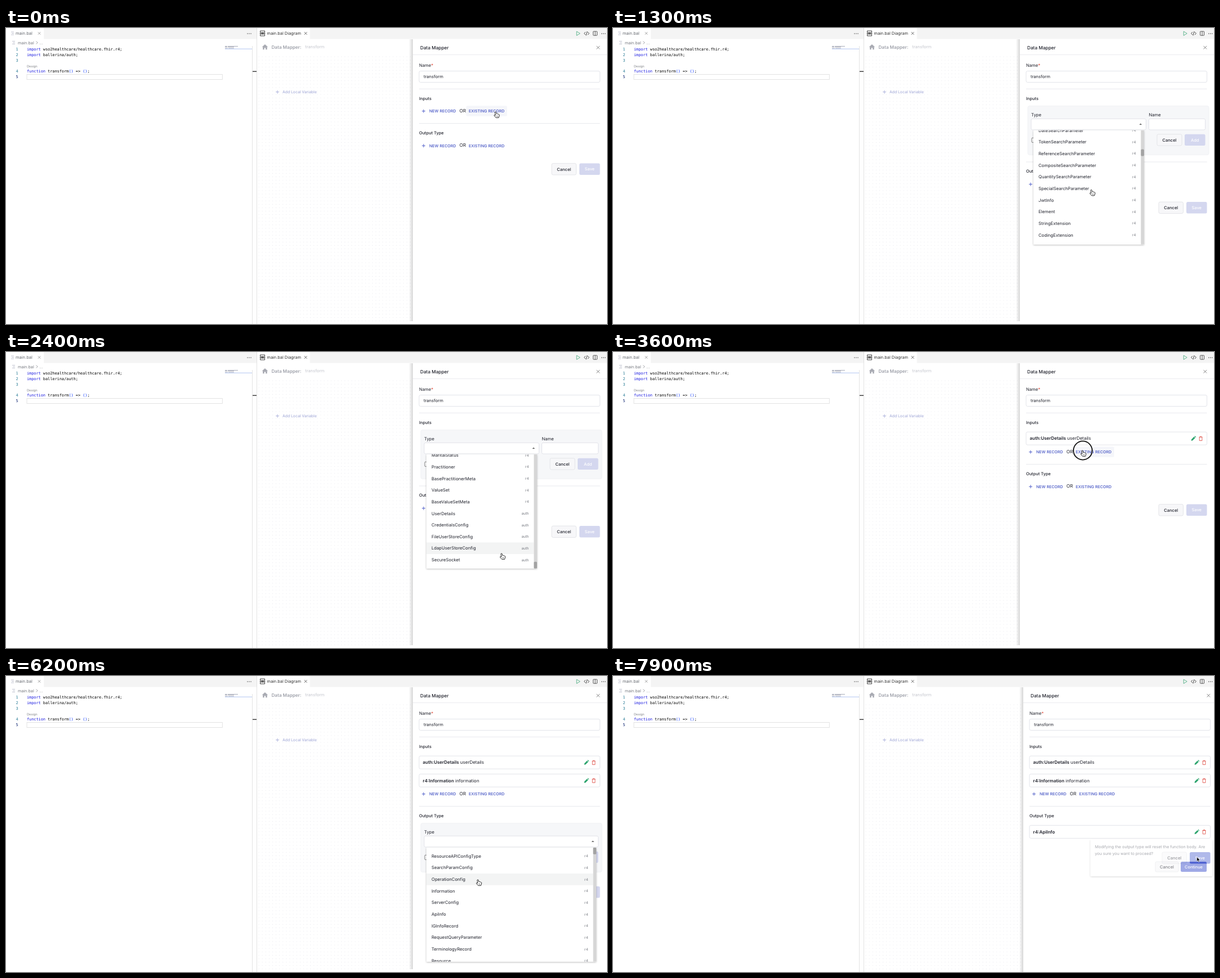
Recreate the animation shown at these times as an HTML page. Size 1065 by 526 pixels, loop 8000 ms.

```html
<!DOCTYPE html>
<html lang="en">
<head>
<meta charset="utf-8">
<title>Data Mapper</title>
<style>
  html, body { margin: 0; width: 100%; height: 100%; overflow: hidden; background: #fff; }
  svg { display: block; width: 1065px; height: 526px; text-rendering: geometricPrecision; }
  text { font-family: Inter, "Open Sans", sans-serif; white-space: pre; }
  .mono { font-family: "DejaVu Sans Mono", monospace; }
</style>
</head>
<body>
<svg id="stage" viewBox="0 0 1065 526">
  <defs>
    <pattern id="dots" x="445" y="48" width="6.1" height="6.1" patternUnits="userSpaceOnUse">
      <circle cx="3" cy="3" r=".5" fill="#e3e3ea"/>
    </pattern>
    <linearGradient id="edge">
      <stop offset="0" stop-color="#000" stop-opacity="0"/>
      <stop offset="1" stop-color="#000" stop-opacity=".16"/>
    </linearGradient>
    <filter id="shadow" x="-10%" y="-10%" width="120%" height="125%">
      <feDropShadow dx="0" dy="1" stdDeviation="1.6" flood-opacity=".28"/>
    </filter>
  </defs>
  <g id="base"></g>
  <g id="panel"></g>
  <g id="pointer"></g>
</svg>
<script>
const LOOP = 8000, STEP = 100;
const INK = '#20222c', BLUE = '#4454c4', PRIMARY = '#5164d2', PALE = '#d4d7ef', LINE = '#dcdee5';
const byId = id => document.getElementById(id);

// ---- drawing helpers ----
const text = (x, y, str, size = 7.7, fill = INK, weight = 400, extra = '') =>
  `<text x="${x}" y="${y + size * .36}" font-size="${size}" fill="${fill}" font-weight="${weight}" ${extra}>${str}</text>`;
const rect = (x, y, w, h, fill, stroke = 'none', r = 0, extra = '') =>
  `<rect x="${x}" y="${y}" width="${w}" height="${h}" rx="${r}" fill="${fill}" stroke="${stroke}" stroke-width=".8" ${extra}/>`;
const path = (d, stroke, width = .8, fill = 'none', extra = '') =>
  `<path d="${d}" fill="${fill}" stroke="${stroke}" stroke-width="${width}" stroke-linejoin="round" ${extra}/>`;
const at = (x, y, body) => `<g transform="translate(${x} ${y})">${body}</g>`;
const cross = (x, y, r, color) => path(`M${x - r} ${y - r}l${2 * r} ${2 * r}m0 ${-2 * r}l${-2 * r} ${2 * r}`, color);
const plus = (x, y, color) => path(`M${x - 3} ${y}h6m-3 -3v6`, color, .9);
const more = (x, y, color) => [-3, 0, 3].map(d => `<circle cx="${x + d}" cy="${y}" r=".75" fill="${color}"/>`).join('');
const button = (x, y, w, h, label, main, color = PRIMARY) =>
  rect(x, y, w, h, main ? color : '#f7f7f9', main ? 'none' : '#dfe0e5', 2.5) +
  text(x + w / 2, y + h / 2, label, main ? 7.4 : 7.5, main ? '#fff' : INK, 500, 'text-anchor="middle"');

// ---- fixed parts ----
function code(y, num, parts, active) {
  const spans = parts.map(([s, c]) => `<tspan fill="${c}">${s}</tspan>`).join('');
  return text(21.6, y, num, 6.85, active ? '#0b216f' : '#237893', 400, 'class="mono" text-anchor="end"') +
    text(37, y, spans, 6.85, '#000', 400, 'class="mono"');
}

function drawBase() {
  const KEY = '#1a1ae0', BR = '#0431fa', K = '#000', GREY = '#777a80';
  const fileIcon = (x, y) => path(`M${x} ${y - 2.5}h5m-4 2.5h4m-5 2.5h5`, '#b4b6c6', .8);
  byId('base').innerHTML =
    rect(0, 0, 1065, 19.5, '#f4f4f4') + rect(0, 0, 67, 20, '#fff') + rect(445, 0, 93.5, 20, '#fff') +
    fileIcon(9, 9.5) + text(17, 9.5, 'main.bal', 7.5, '#686b72') + cross(59, 9.5, 2.2, '#888') + more(431, 10, '#444') +
    fileIcon(11, 26) + text(21, 26, 'main.bal', 7.2, GREY) + path('M53.5 23.5l2.5 2.5l-2.5 2.5', GREY, .7) + text(59, 26, '...', 7.2, GREY) +
    code(37.5, 1, [['import', KEY], [' wso2healthcare/healthcare.fhir.r4;', K]]) +
    code(47.5, 2, [['import', KEY], [' ballerina/auth;', K]]) +
    code(57.7, 3, []) + text(37, 67.5, 'Design', 5.7, '#85878c') +
    code(77, 4, [['function', KEY], [' transform', K], ['()', BR], [' =&gt; ', K], ['()', BR], [';', K]]) +
    rect(37, 82.4, 346.3, 9.2, 'none', '#dcdcdc') + code(87, 5, [], true) +
    path('M388 32.5h4m1 0h18M388 33.8h4m1 0h11M388 36h5m1 0h10', '#868a9c', .7) + path('M388 37.2h48', '#9db7ee', .8) +
    path('M436.5 32v494M444.5 0v526', '#dcdcdc') + path('M437 77.2h7', '#222', 1.3) +
    path('M450.5 5h8v3h-8zM450.5 11h8v3h-8zM454.5 8v3M449.5 9.5h10', '#333', .9) +
    text(462.5, 9.5, 'main.bal Diagram', 7.35, '#333') + cross(531, 9.5, 2.4, '#444') +
    path('M1011.2 6l6 3.7l-6 3.7z', '#3aa775') +
    path('M1027 7l-2.5 2.6l2.5 2.6M1030.8 7l2.5 2.6l-2.5 2.6M1029.9 6l-2 7.4', '#333', .9) +
    rect(1040.5, 6, 7, 7.2, 'none', '#333', .6) + path('M1044 6v7.2', '#333') + more(1058.7, 10, '#333') +
    path('M453.7 33.8l5.2 -4.8l5.2 4.8h-1.4v4.4h-2.6v-3h-2.4v3h-2.6v-4.4z', 'none', 0, '#a9abb3') +
    text(470.5, 33.7, 'Data Mapper:', 8.1, '#a0a3ac', 600) + text(530, 33.7, 'transform', 7.5, '#c4c6cd') +
    `<rect id="grid" x="445" y="48" width="276" height="473" fill="url(#dots)"/>` +
    plus(481, 113.7, '#a5acd9') + text(490, 114, 'Add Local Variable', 6.8, '#a9afda', 500);
}

// ---- record list ----
const ROW = 20.66, LIST_H = 203, THUMB = 12;
const words = s => s.trim().split(/\s+/);
const head = words(`ResourceAPIConfigType SearchParamConfig OperationConfig Information ServerConfig ApiInfo
  IGInfoRecord RequestQueryParameter TerminologyRecord Resource DomainResource Bundle BundleEntry BundleLink
  Meta Narrative Identifier Coding CodeableConcept Reference Period HumanName OperationOutcome Annotation
  UriSearchParameter NumberSearchParameter StringSearchParameter DateSearchParameter TokenSearchParameter
  ReferenceSearchParameter CompositeSearchParameter QuantitySearchParameter SpecialSearchParameter
  JwtInfo Element StringExtension CodingExtension`);
const kinds = words(`Code Integer Decimal Boolean Instant Address Age Attachment Contact Count Distance Dosage
  Duration Expression Money Quantity Range Ratio Sampled Signature Timing Trigger Usage Location Device
  Patient Encounter Condition Procedure Observation`);
const tail = words(`MaritalStatus Practitioner BasePractitionerMeta ValueSet BaseValueSetMeta
  UserDetails CredentialsConfig FileUserStoreConfig LdapUserStoreConfig SecureSocket`);
const middle = ['Extension', '', 'Meta', 'Profile'].flatMap(s => kinds.map(k => k + s)).slice(0, 119);
const records = [...head, ...middle, ...tail];
const MAX_SCROLL = records.length * ROW + 10 - LIST_H;

function list(top, w, scroll, hover) {
  const right = 745 + w;
  let out = rect(745, top, w, LIST_H, '#fff', 'none', 1, 'filter="url(#shadow)"') +
    `<clipPath id="view"><rect x="745" y="${top}" width="${w}" height="${LIST_H}"/></clipPath><g clip-path="url(#view)">`;
  const first = Math.max(0, Math.floor(scroll / ROW) - 1);
  for (let i = first; i < Math.min(records.length, first + 13); i++) {
    const y = top + 5 + i * ROW - scroll;
    if (hover > y && hover < y + ROW) out += rect(745, y, w - 5.5, ROW, '#f3f4f4');
    out += text(754, y + ROW / 2, records[i]) +
      text(right - 14.5, y + ROW / 2, i < records.length - 5 ? 'r4' : 'auth', 6.3, '#74777f', 400, 'text-anchor="end"');
  }
  const thumbY = top + scroll / MAX_SCROLL * (LIST_H - THUMB);
  return out + rect(right - 5.5, top, 5.5, LIST_H, '#d6d6d6') + rect(right - 5.5, thumbY, 5.5, THUMB, '#a3a3a3', 'none', 1.5) + '</g>';
}

// ---- side panel ----
function recordRow(y, p) {
  const hot = p.x > 815 && p.x < 888 && Math.abs(p.y - y) < 9.5;
  return (hot ? rect(815.5, y - 9.5, 72.5, 18.6, '#f5f6fa', 'none', 2) : '') +
    plus(740, y, BLUE) + text(750, y, 'NEW RECORD', 7, BLUE, 500) +
    text(803.5, y - .7, 'OR', 8.2) + text(820, y, 'EXISTING RECORD', 7, BLUE, 500);
}

function item(y, type, name = '') {
  const pencil = path('M-4 4l.5 -2.6l4.6 -4.6l2.1 2.1l-4.6 4.6zM1.8 -3.9l.9 -.8l2 2l-.9 .9z', 'none', 0, '#2fa56f');
  const bin = path('M-3 -2.7h6M-1.2 -2.7v-1h2.4v1M-2.3 -2.7v6.3h4.6v-6.3', '#e0564f', .9);
  return rect(732, y - 11.5, 320.5, 23, '#fff', LINE, 2.5) +
    text(738.5, y, `<tspan font-weight="600">${type}</tspan> ${name}`, 7.95) +
    at(1028.5, y + .2, pencil) + at(1041.5, y + .3, bin);
}

function form(top, f, p, t, wide) {
  const w = wide ? 308.5 : 203.5, right = 741 + w, mid = top + 32.5, by = top + 50.3;
  const tip = f.open ? `M${right - 12} ${mid + 1}l2.4 -2.4l2.4 2.4z` : `M${right - 12} ${mid - 1}l2.4 2.4l2.4 -2.4z`;
  const caret = f.open && t % 1000 >= 500;
  return rect(735, top, 321, 87, '#f6f7f9', '#eff0f3', 3) +
    text(741, top + 16, 'Type') + rect(741, top + 22.8, w, 19.7, '#fff', LINE, 2.5) +
    (f.value ? text(745, mid, f.value) : '') + path(tip, 'none', 0, '#666') +
    (caret ? path(`M745.5 ${mid - 4.5}v9`, '#222', .7) : '') +
    (wide ? '' : text(949.5, top + 16, 'Name') + rect(949.5, top + 22.8, 100, 19.7, '#fff', LINE, 2.5) +
      text(958, mid, f.name || '')) +
    rect(742, top + 56.8, 8, 8, '#fff', '#666', 1) + text(757, top + 61.2, 'Is Array') +
    button(964, by, 44, 20.2, 'Cancel') + button(1013, by, 36.5, 20.2, 'Add', true, f.value ? PRIMARY : PALE);
}

function dialog() {
  return `<g opacity=".55">` + rect(840, 290.5, 216, 65.5, '#fff', 'none', 2, 'filter="url(#shadow)"') +
    text(848, 303.3, 'Modifying the output type will reset the function body. Are', 7.1, '#60636e') +
    text(848, 315.8, 'you sure you want to proceed?', 7.1, '#60636e') +
    button(955, 330, 41, 18, 'Cancel') + button(1000, 330, 46, 18, 'Continue', true) + '</g>';
}

function drawPanel(s, p, t) {
  const n = s.items.length, shift = s.dialog ? 6 : 0, bottom = s.dialog ? 526 : 521;
  const rule = y => path(`M732 ${y}h320.5`, '#e3e4e9');
  let out = rect(714, 20, 7, bottom - 20, 'url(#edge)') + rect(721, 19.8, 350, 507, '#fff') +
    path('M721 47.5h344', '#e6e7eb') + text(734, 34.6, 'Data Mapper', 8.2, INK, 500) + cross(1049.3, 34.7, 2.8, '#666') +
    text(732, 66.2, 'Name<tspan fill="#e0402f">*</tspan>') + rect(732, 76.5, 320.5, 20, '#fff', LINE, 2.5) +
    text(740, 86.4, 'transform', 7.6) + rule(108.3) + text(732, 125.3, 'Inputs', 7.4, INK, 500);
  s.items.forEach(([type, name], i) => out += item(153.6 + 32.1 * i, type, name));

  const gap = n ? 30 + 32 * (n - 1) : 0, inForm = s.form && !s.form.output;
  let formTop = 138.5 + gap, sep;
  if (inForm) { out += form(formTop, s.form, p, t); sep = formTop + 99.5; }
  else { out += recordRow(147.7 + gap, p); sep = 169.5 + gap; }

  const label = sep + 16.7;
  out += rule(sep) + text(732, label, 'Output Type', 7.4, INK, 500);
  let foot;
  if (s.form && s.form.output) {
    formTop = label + 13.3;
    out += form(formTop, s.form, p, t, true);
    foot = formTop + 122.5;
  } else if (s.output) {
    out += item(label + 28.7, s.output);
    foot = label + 75;
  } else {
    out += recordRow(label + 23, p);
    foot = label + 64.6;
  }
  out += button(967, foot - 10.2, 43.5, 20.4, 'Cancel') + button(1016, foot - 10.2, 36.5, 20.4, 'Save', true, s.output ? PRIMARY : PALE);
  if (s.form && s.form.open) {
    const scroll = inForm && !n ? scrollAt(t) : 0;
    const moving = inForm && !n && t > 900 && t < 2300;
    out += list(formTop + 43.2, s.form.output ? 301 : 196, scroll, moving ? -1 : p.y);
  }
  if (s.dialog) out += dialog();
  byId('grid').setAttribute('width', 276 + shift);
  byId('grid').setAttribute('height', bottom - 48);
  byId('panel').innerHTML = at(shift, 0, out);
}

// ---- timeline ----
const user = ['auth:UserDetails', 'userDetails'], info = ['r4:Information', 'information'];
const scenes = [
  [0, { items: [] }],
  [300, { items: [], form: {} }],
  [700, { items: [], form: { open: true } }],
  [2800, { items: [], form: { value: 'UserDetails', name: 'userDetails' } }],
  [3200, { items: [user] }],
  [3800, { items: [user], form: {} }],
  [4100, { items: [user], form: { open: true } }],
  [4700, { items: [user], form: { value: 'Information', name: 'information' } }],
  [5400, { items: [user, info] }],
  [5700, { items: [user, info], form: { output: true } }],
  [5900, { items: [user, info], form: { output: true, open: true } }],
  [6600, { items: [user, info], form: { output: true, value: 'ApiInfo' } }],
  [7200, { items: [user, info], output: 'r4:ApiInfo' }],
  [7900, { items: [user, info], output: 'r4:ApiInfo', dialog: true }]
];
const moves = [
  [0, 868.5, 149], [200, 862, 148], [300, 858, 150], [600, 852, 171], [700, 850, 190], [1000, 849, 284],
  [1300, 848.5, 287.5], [1900, 856, 310], [2400, 879, 358], [2700, 822, 287], [2800, 830, 284], [3000, 1029, 199],
  [3300, 1029, 199], [3600, 832.5, 175], [3700, 832.5, 175], [4000, 846, 201], [4300, 838, 245], [4600, 812, 288],
  [4700, 820, 286], [5100, 1024, 231], [5300, 1027, 230.5], [5600, 850, 270], [5800, 846, 293], [6000, 840, 330],
  [6200, 837, 362], [6500, 808, 422], [6600, 815, 420], [6900, 1028, 321], [7200, 1030, 321], [7600, 1034, 322], [8000, 1034.8, 321.8]
];
const scrolls = [[900, 0], [1000, 70], [1300, 573], [1700, 1650], [2100, 2960], [2300, MAX_SCROLL]];
const clicks = [200, 600, 2700, 3100, 3600, 4000, 4600, 5200, 5600, 5800, 6500, 7000, 7700];

function track(keys, t, i, ease) {
  const b = keys.findIndex(k => k[0] > t);
  if (b === 0) return keys[0][i];
  if (b < 0) return keys[keys.length - 1][i];
  const [p, q] = [keys[b - 1], keys[b]], u = (t - p[0]) / (q[0] - p[0]);
  return p[i] + (q[i] - p[i]) * (ease ? u * u * (3 - 2 * u) : u);
}
const scrollAt = t => track(scrolls, t, 1);

const hand = path('M-2 1.1C-2 -.5 0 -.5 .2 1L.8 3.7C1.4 3.1 2.4 3.2 2.6 4C3.2 3.5 4.2 3.8 4.3 4.6C5 4.3 5.8 4.8 5.8 5.6' +
  'L5.3 8.4L4.5 10.4H-.2L-3.2 7C-4 5.8 -2.9 5 -2 5.6L-1.1 6.3Z', '#111', .9, '#fff') +
  path('M1.2 6.8v2M2.8 6.8v2', '#111', .6);
const arrow = path('M0 0v7.6l1.8 -1.6l1.3 3l1.3 -.6l-1.3 -2.9h2.4z', '#fff', .6, '#000');

function draw(t) {
  const scene = scenes.filter(s => s[0] <= t).pop()[1];
  const p = { x: track(moves, t, 1, true), y: track(moves, t, 2, true) };
  drawPanel(scene, p, t);
  const ring = clicks.includes(t) ? '<circle r="16.6" fill="none" stroke="#111" stroke-width="1.8"/>' : '';
  byId('pointer').innerHTML = at(p.x, p.y, ring + (scene.dialog ? arrow : hand));
}

drawBase();
const start = performance.now();
let shown = -1;
function tick() {
  const t = Math.floor((performance.now() - start) % LOOP / STEP) * STEP;
  if (t !== shown) draw(shown = t);
  requestAnimationFrame(tick);
}
tick();
</script>
</body>
</html>
```
